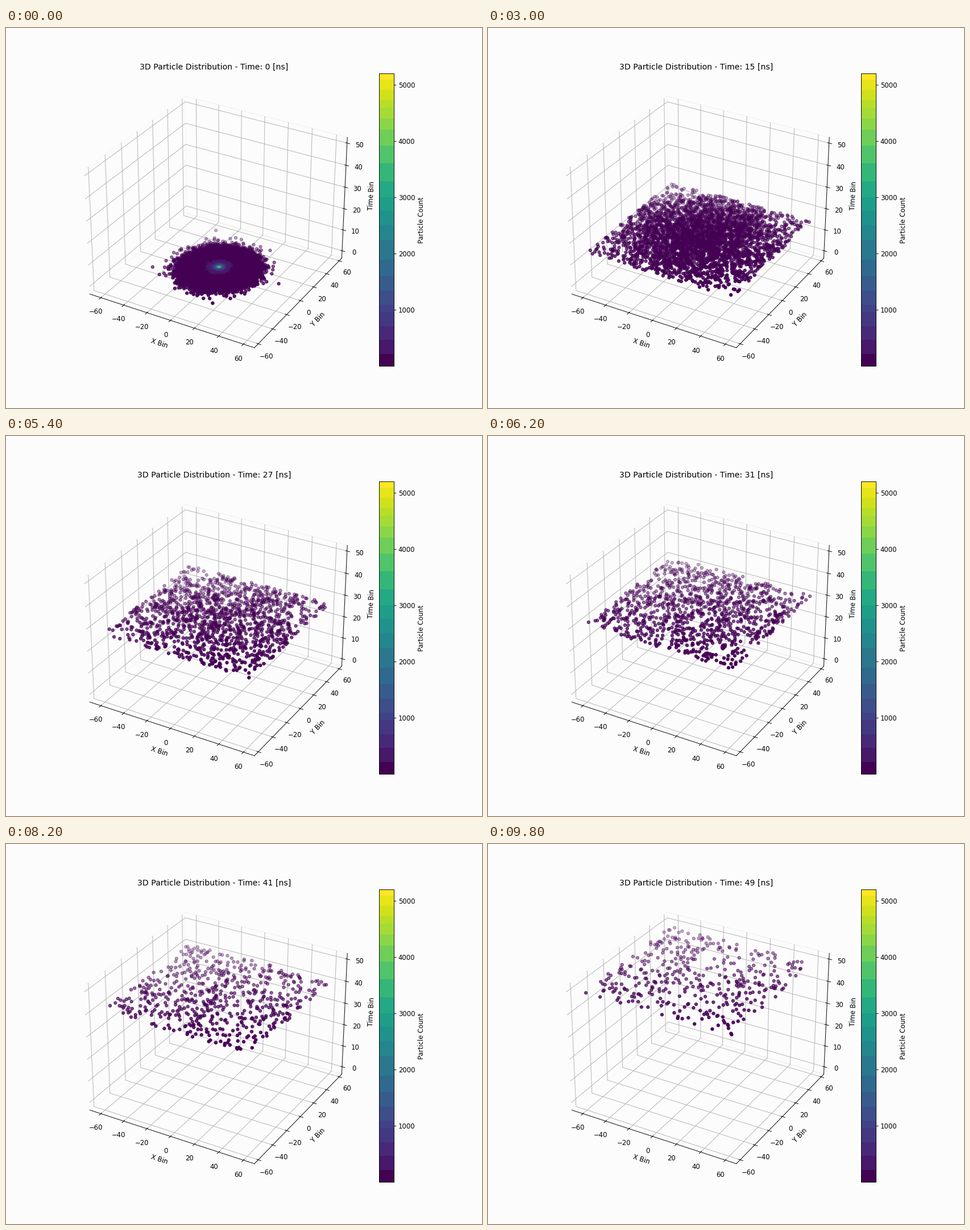
Recreate the animation shown at these times as a matplotlib script. Size 837 by 669 pixels, loop 10000 ms.

```python
import numpy as np
import matplotlib.pyplot as plt
from matplotlib.animation import FuncAnimation
from matplotlib.cm import ScalarMappable
from matplotlib.colors import ListedColormap, Normalize

DPI = 83.7
WIDTH, HEIGHT = 837.01, 669.01
PAPER = "#fcfcfc"
STEPS = 50
X_RANGE, Y_RANGE, Z_RANGE = (-61, 60), (-57, 56), (0, STEPS - 1)


def banded_viridis(size=516):
    """Viridis in uneven flat bands."""
    edges = np.array([0, .041, .089, .138, .186, .211, .258, .308, .364, .432,
                      .483, .531, .578, .632, .694, .754, .808, .847, .884,
                      .911, .944, .979, 1])
    shades = (edges[:-1] + edges[1:]) / 2
    shades[0], shades[-1] = 0, 1
    pos = (np.arange(size) + .5) / size
    band = np.searchsorted(edges, pos) - 1
    return ListedColormap(plt.get_cmap("viridis")(shades[band]))


def padded(lo, hi):
    """Data limits with a 5 % margin and the usual 3D view margin."""
    pad = (hi - lo) * (1.1 * 25 / 24 - 1) / 2
    return lo - pad, hi + pad


def gauss(r, sigma):
    return np.exp(-r**2 / (2 * sigma**2))


gx, gy = np.meshgrid(np.arange(X_RANGE[0], X_RANGE[1] + 1),
                     np.arange(Y_RANGE[0], Y_RANGE[1] + 1))
radius = np.hypot(gx, gy)


def mean_count(t):
    """Expected particles per bin: a bright burst that spreads and decays."""
    core = 4800 * np.exp(-radius / 1.8 - 3 * t)
    burst = 350 * np.exp(-t) * gauss(radius, 9 + 4 * t)
    tail = 0.5 * np.exp(-t) * gauss(radius, 14)
    peak = 3.1 * (1 - t / 52)**2
    spread = np.exp(-1.35 - .045 * t + peak * (1 - (radius / 60)**2))
    return core + burst + tail + (1 - np.exp(-t)) * spread


cmap = banded_viridis()
norm = Normalize(1, 5200)

fig = plt.figure(figsize=(WIDTH / DPI, HEIGHT / DPI), dpi=DPI, facecolor=PAPER)
ax = fig.add_subplot(projection="3d", facecolor=PAPER)
fig.colorbar(ScalarMappable(norm, cmap), ax=ax, label="Particle Count")

ax.set(xlim=padded(*X_RANGE), ylim=padded(*Y_RANGE), zlim=padded(*Z_RANGE),
       xlabel="X Bin", ylabel="Y Bin", zlabel="Time Bin")
for axis in (ax.xaxis, ax.yaxis, ax.zaxis):
    axis.pane.fill = False

dots = []


def clear():
    while dots:
        dots.pop().remove()
    return []


def update(t):
    clear()
    counts = np.random.default_rng(t + 7).poisson(mean_count(t))
    hit = counts > 0
    dots.append(ax.scatter(gx[hit], gy[hit], np.full(hit.sum(), t),
                           c=counts[hit], cmap=cmap, norm=norm))
    ax.set_title(f"3D Particle Distribution - Time: {t} [ns]")
    return dots


anim = FuncAnimation(fig, update, frames=STEPS, init_func=clear,
                     interval=200, repeat=True, repeat_delay=0)
plt.show()
```
